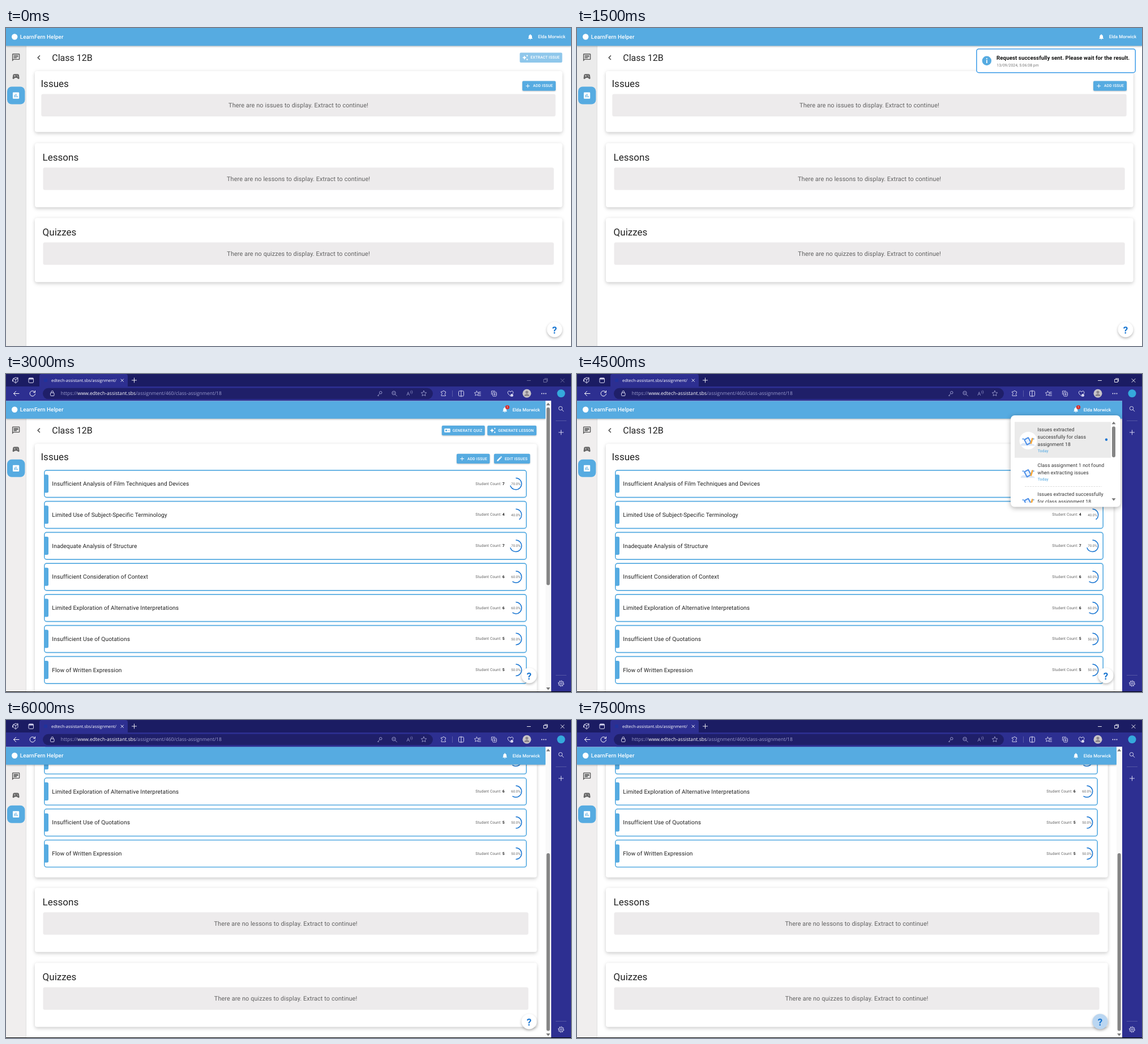
Animation of 998 by 561 pixels, one loop 8 s. Source, as an HTML page:

```html
<!DOCTYPE html>
<html lang="en">
<head>
<meta charset="utf-8">
<title>Class issues</title>
<style>
html, body { margin: 0; width: 100%; height: 100%; overflow: hidden; background: #fff; }
svg { display: block; width: 998px; height: 561px; }
text { font-family: Roboto, sans-serif; letter-spacing: .009em; white-space: pre; text-rendering: geometricPrecision; }
.chrome { font-family: "Open Sans", sans-serif; letter-spacing: 0; }
.title { letter-spacing: 0; }
.button { font-weight: 500; letter-spacing: .03em; }
.card { filter: drop-shadow(0 3px 3px rgba(0,0,0,.15)) drop-shadow(0 0 3px rgba(0,0,0,.07)); }
.bar { filter: drop-shadow(0 1px 1.5px rgba(0,0,0,.3)); }
.raised { filter: drop-shadow(0 1px 1px rgba(0,0,0,.22)); }
.float { filter: drop-shadow(0 2px 2px rgba(0,0,0,.28)); }
.menu { filter: drop-shadow(0 2px 4px rgba(0,0,0,.32)); }
</style>
</head>
<body>
<svg id="stage" viewBox="0 0 998 561"></svg>
<script>
const BLUE = '#56abe1', DEEP = '#1976d2', INK = '#212121', GREY = '#666';
const PANEL = '#edebec', NAVY = '#1b1c63', INDIGO = '#2d2f91', PALE = '#d5d5ef';
const CHROME_H = 47.3, BAR_H = 31.5, PITCH = 54.75, SCROLL = 286.6;

const ICONS = {
  chat: 'M4 4h16v12H5.17L4 17.17V4m0-2c-1.1 0-1.99.9-1.99 2L2 22l4-4h14c1.1 0 2-.9 2-2V4c0-1.1-.9-2-2-2H4zm2 10h8v2H6v-2zm0-3h12v2H6V9zm0-3h12v2H6V6z',
  game: 'M21.58 16.09l-1.09-7.66C20.21 6.46 18.52 5 16.53 5H7.47C5.48 5 3.79 6.46 3.51 8.43l-1.09 7.66C2.2 17.63 3.39 19 4.94 19c.68 0 1.32-.27 1.8-.75L9 16h6l2.25 2.25c.48.48 1.13.75 1.8.75 1.56 0 2.75-1.37 2.53-2.91zM11 11H9v2H8v-2H6v-1h2V8h1v2h2v1zm4-1a1 1 0 110-2 1 1 0 010 2zm2 3a1 1 0 110-2 1 1 0 010 2z',
  chart: 'M19 3H5c-1.1 0-2 .9-2 2v14c0 1.1.9 2 2 2h14c1.1 0 2-.9 2-2V5c0-1.1-.9-2-2-2zM9 17H7v-7h2v7zm4 0h-2V7h2v10zm4 0h-2v-4h2v4z',
  bell: 'M12 22c1.1 0 2-.9 2-2h-4c0 1.1.89 2 2 2zm6-6v-5c0-3.07-1.64-5.64-4.5-6.32V4c0-.83-.67-1.5-1.5-1.5s-1.5.67-1.5 1.5v.68C7.63 5.36 6 7.92 6 11v5l-2 2v1h16v-1l-2-2z',
  add: 'M19 13h-6v6h-2v-6H5v-2h6V5h2v6h6v2z',
  edit: 'M3 17.25V21h3.75L17.81 9.94l-3.75-3.75L3 17.25zM20.71 7.04c.39-.39.39-1.02 0-1.41l-2.34-2.34c-.39-.39-1.02-.39-1.41 0l-1.83 1.83 3.75 3.75 1.83-1.83z',
  sparkle: 'M19 9l1.25-2.75L23 5l-2.75-1.25L19 1l-1.25 2.75L15 5l2.75 1.25L19 9zm-7.5.5L9 4 6.5 9.5 1 12l5.5 2.5L9 20l2.5-5.5L17 12l-5.5-2.5zM19 15l-1.25 2.75L15 19l2.75 1.25L19 23l1.25-2.75L23 19l-2.75-1.25L19 15z',
  quiz: 'M3 5h18a2 2 0 012 2v10a2 2 0 01-2 2H3a2 2 0 01-2-2V7a2 2 0 012-2zM5 9v6h6V9zM14 10.500v3h2v-3zM18 10.500v3h2v-3z',
  back: 'M15.41 7.41L14 6l-6 6 6 6 1.41-1.41L10.830 12z'
};

const ISSUES = [
  ['Insufficient Analysis of Film Techniques and Devices', 7],
  ['Limited Use of Subject-Specific Terminology', 4],
  ['Inadequate Analysis of Structure', 7],
  ['Insufficient Consideration of Context', 6],
  ['Limited Exploration of Alternative Interpretations', 6],
  ['Insufficient Use of Quotations', 5],
  ['Flow of Written Expression', 5]
];

const SCENES = [
  { at: 0, width: 998 },
  { at: 1500, width: 998, toast: true },
  { at: 3000, width: 953, browser: true, badge: true, dimmed: true },
  { at: 4500, width: 963, browser: true, badge: true, menu: true },
  { at: 6000, width: 953, browser: true, scroll: SCROLL },
  { at: 7500, width: 953, browser: true, scroll: SCROLL, hover: true }
];
const LOOP = 8000;

const rect = (x, y, w, h, fill, r = 0, extra = '') =>
  `<rect x="${x}" y="${y}" width="${w}" height="${h}" rx="${r}" fill="${fill}" ${extra}/>`;
const circle = (x, y, r, fill, extra = '') =>
  `<circle cx="${x}" cy="${y}" r="${r}" fill="${fill}" ${extra}/>`;
const stroke = (d, color = PALE, w = 1) =>
  `<path d="${d}" fill="none" stroke="${color}" stroke-width="${w}" stroke-linecap="round" stroke-linejoin="round"/>`;
const ring = (x, y, r, color = PALE, w = 1, extra = '') =>
  circle(x, y, r, 'none', `stroke="${color}" stroke-width="${w}" ${extra}`);
const group = (content, x = 0, y = 0) => `<g transform="translate(${x} ${y})">${content}</g>`;
// y is the middle of the capitals
const text = (x, y, size, content, fill = INK, extra = '') =>
  `<text x="${x}" y="${y + size * .355}" font-size="${size}" fill="${fill}" ${extra}>${content}</text>`;
const icon = (name, x, y, size, fill = '#fff') =>
  `<path transform="translate(${x - size / 2} ${y - size / 2}) scale(${size / 24})" fill="${fill}" fill-rule="evenodd" d="${ICONS[name]}"/>`;
const MIDDLE = 'text-anchor="middle"';
const MEDIUM = 'font-weight="500"';

function button(x, y, w, label, name, fill = BLUE) {
  const shadow = fill === BLUE ? 'class="raised"' : '';
  return rect(x, y, w, 17.3, fill, 2, shadow) + icon(name, x + 9.7, y + 8.700, 11.5)
    + text(x + 19, y + 8.5, 6.75, label, '#fff', 'class="button"');
}

const card = (y, h, width) => rect(51, y, width - 66.3, h, '#fff', 4, 'class="card"');

function emptyPanel(x, y, right, kind) {
  return rect(x, y, right - x, 39.6, PANEL, 3)
    + text((x + right) / 2, y + 19.9, 10.87, `There are no ${kind} to display. Extract to continue!`, '#616161', MIDDLE);
}

function emptyCard(y, width, title) {
  return card(y, 113, width) + text(64.6, y + 24.7, 17, title, INK, 'class="title"')
    + emptyPanel(65.5, y + 43, width - 30.3, title.toLowerCase());
}

function issueRow([name, count], i, width) {
  const y = 121.8 + i * PITCH, mid = y + 24.4, x = width - 52.5;
  return rect(67.8, y + .8, width - 101.6, 47.700, '#fff', 4, `stroke="${BLUE}" stroke-width="1.6"`)
    + `<path d="M67.5 ${y + 8.5}h5a2.5 2.5 0 0 1 2.5 2.500v27a2.500 2.500 0 0 1-2.500 2.500h-5z" fill="${BLUE}"/>`
    + text(81.3, mid, 10.2, name)
    + text(width - 123.7, mid - .2, 6.8, `Student Count: <tspan font-weight="700" fill="${INK}">${count}</tspan>`, GREY)
    + ring(x, mid + .2, 10.2, DEEP, 1.5, `pathLength="100" stroke-dasharray="${count * 10} 100" transform="rotate(-90 ${x} ${mid + .2})"`)
    + text(x, mid + .2, 6.1, count * 10 + '.0%', GREY, MIDDLE);
}

function content({ width, browser }) {
  const heading = icon('back', 58, 52.3, 17, '#444') + text(81.3, 52.4, 16, 'Class 12B', INK, 'class="title"');
  const title = text(61.5, 98.4, 17, 'Issues', INK, 'class="title"');
  if (!browser) {
    return heading + button(907.5, 43.6, 75, 'EXTRACT ISSUE', 'sparkle', '#8fc7eb')
      + card(76, 107.5, width) + title + button(912, 93.5, 59, 'ADD ISSUE', 'add')
      + emptyPanel(62.3, 116.5, 970.7, 'issues')
      + emptyCard(203.2, width, 'Lessons') + emptyCard(335.2, width, 'Quizzes');
  }
  return heading
    + button(width - 183.2, 43.6, 76, 'GENERATE QUIZ', 'quiz')
    + button(width - 102.7, 43.6, 86.700, 'GENERATE LESSON', 'sparkle')
    + card(76, 441, width) + title
    + button(width - 157, 93.5, 58.5, 'ADD ISSUE', 'add')
    + button(width - 91, 93.5, 63.7, 'EDIT ISSUES', 'edit')
    + ISSUES.map((issue, i) => issueRow(issue, i, width)).join('')
    + emptyCard(535.5, width, 'Lessons') + emptyCard(667.9, width, 'Quizzes');
}

function appFrame({ width, browser, badge }) {
  const inner = browser ? 953 : 998;
  return rect(0, BAR_H, 35, 530, browser ? '#f0eeee' : '#ebebeb') + rect(35, BAR_H, .8, 530, '#d9d9d9')
    + icon('chat', 17.6, 52, 16, '#555') + icon('game', 17.6, 85.6, 15, '#666')
    + rect(2, 103.5, 31.4, 31, BLUE, 8) + icon('chart', 17.6, 119, 15)
    + rect(0, 0, width, BAR_H, BLUE, 0, 'class="bar"')
    + circle(15.2, 15.5, 5.2, '#fff')
    + text(24.800, 15.4, 9.75, 'LearnFern Helper', '#fff', MEDIUM)
    + icon('bell', inner - 71.800, 15.6, 11.5)
    + (badge ? circle(885.6, 11.3, 3.7, '#d32f2f') + text(885.6, 11.3, 5, '1', '#fff', MIDDLE) : '')
    + text(inner - 58.3, 15.4, 7.9, 'Elda Morwick', '#fff', MEDIUM);
}

function helpButton({ width, hover }) {
  const x = width - 29;
  return circle(x, 532, 13.5, hover ? '#bad6f1' : '#fff', 'class="float"')
    + text(x, 532.7, 17, '?', DEEP, `${MIDDLE} font-weight="700"`);
}

function toast() {
  return rect(705.8, 36.9, 280.5, 41.8, '#fff', 4, 'stroke="#3b9be8" stroke-width="1.5"')
    + circle(723.8, 57.800, 8.2, BLUE) + circle(723.8, 54, 1.1, '#fff') + rect(723, 56.300, 1.700, 5.700, '#fff')
    + text(741, 53, 9.68, 'Request successfully sent. Please wait for the result.', '#111', 'font-weight="700"')
    + text(741.3, 65.3, 6.8, '13/09/2024, 5:06:08 pm', '#757575');
}

function arrow(x, y, dir) {
  return `<path d="M${x - 3.5} ${y + 2 * dir}h7l-3.5 ${-4.5 * dir}z" fill="#777"/>`;
}

function pageScrollbar(top) {
  return rect(953, CHROME_H, 10, 513, '#f9f9f9') + arrow(957.7, 53.3, 1) + arrow(957.7, 555, -1)
    + rect(954.700, top, 6, 313.500, '#858585', 3);
}

function notice(y, lines, unread) {
  const mid = y + lines.length * 6.5;
  const art = circle(797, mid, 15.5, '#fff')
    + `<path d="M784 ${mid + 7}q3-4 7-2q6-4 10 1q6-1 8 3h-25z" fill="#dbe6f5"/>`
    + group(rect(-5, -6, 10, 12, '#4c8fe8', 1.5) + rect(-3, -4, 6, 8, '#e8f1fd', 1), 796, mid + 1).replace(')"', ') rotate(-28)"')
    + group(rect(-1.4, -6, 2.800, 11, '#f4a63a', 1), 803, mid + 1).replace(')"', ') rotate(18)"')
    + circle(788, mid - 3, 1.5, '#7db2ef') + circle(806.500, mid - 3, 1.3, '#7db2ef');
  return (unread ? rect(773, 84.5, 170, 63.3, '#ebebeb') + circle(935, 115.8, 2.2, DEEP) : '') + art
    + lines.map((line, i) => text(813.6, y + i * 13.1, 8.7, line, '#333')).join('')
    + text(813.8, y + lines.length * 13.1 - 1.6, 7, 'Today', '#69b4e6', MEDIUM);
}

function menu() {
  return rect(766, 73, 194, 161.5, '#fff', 7, 'class="menu"')
    + '<clipPath id="menuClip"><rect x="770" y="79" width="186" height="148"/></clipPath><g clip-path="url(#menuClip)">'
    + notice(98, ['Issues extracted', 'successfully for class', 'assignment 18'], true)
    + notice(161.2, ['Class assignment 1 not found', 'when extracting issues'])
    + '<path d="M791 198.5H927" stroke="#ddd" stroke-dasharray="3 1.500"/>'
    + notice(212, ['Issues extracted successfully', 'for class assignment 18']) + '</g>'
    + arrow(948, 86.500, 1) + arrow(948, 221.300, -1) + rect(945, 92.500, 6, 54.500, '#858585', 3);
}

function lens(x, y, color) {
  return ring(x - 1, y - 1, 3.2, color) + stroke(`M${x + 1.4} ${y + 1.4}l3 3`, color);
}

function star(x, y, r, color) {
  const points = Array.from({ length: 10 }, (_, i) => {
    const a = i * Math.PI / 5, d = i % 2 ? r * .48 : r;
    return `${x + d * Math.sin(a)} ${y - d * Math.cos(a)}`;
  });
  return stroke('M' + points.join('L') + 'z', color, .9);
}

function chrome({ dimmed }) {
  const win = dimmed ? '#7374a5' : '#fff', soft = '#9a9bce';
  return rect(0, 0, 998, 23, NAVY) + rect(0, 22, 998, 25.3, INDIGO) + rect(963, 22, 35, 539, INDIGO)
    + rect(59, 0, 156, 26, INDIGO, 4)
    // tab strip
    + stroke('M13 8l4-2 4 2v5l-4 3-4-3zM13 8l4 2 4-2M17 10v6M11.500 10v3M20 6l1.500 1')
    + rect(40, 7, 8.500, 8.500, 'none', 1.5, `stroke="${PALE}"`) + rect(40, 7, 8.500, 2.5, PALE, 1)
    + rect(67, 8, 6, 6, '#20329c', 1)
    + text(80, 11, 7.4, 'edtech-assistant.sbs/assignment/', '#fff', 'class="chrome"')
    + stroke('M203 9l4.500 4.500M207.500 9l-4.500 4.500M222.500 11h8M226.500 7v8', '#fff', .9)
    + stroke('M920.500 11.500h6M950 9.500h5v5h-5zM951.500 8h5v5M980 8.500l6 6M986 8.500l-6 6', win, .9)
    // address row
    + stroke('M23 34.500H13.500m4-4l-4 4 4 4', '#fff')
    + stroke('M50.500 31.500a4.700 4.700 0 1 0 1 3.500M51.500 29.500v3h-3', '#fff')
    + rect(65, 24.800, 689, 19.500, '#1f1f69', 9.7)
    + rect(78.500, 33, 6.500, 5.500, 'none', 1, `stroke="${PALE}"`) + stroke('M80 33v-1.500a1.750 1.750 0 0 1 3.500 0V33')
    + text(96.7, 34.4, 8.61, 'https://<tspan fill="#fff">www.edtech-assistant.sbs</tspan>/assignment/460/class-assignment/18', soft, 'class="chrome"')
    + ring(661.800, 32.800, 2.2, soft) + stroke('M660.300 34.500l-3.800 3.800h2', soft)
    + lens(686, 34.500, soft) + stroke('M683.500 33.500h3', soft, .8)
    + text(707.500, 35, 9, 'A', soft, 'class="chrome"') + stroke('M714.500 30q2 2 0 4M716.500 29q3 3 0 6', soft, .7)
    + star(738, 34.500, 5, soft)
    + stroke('M769 31h2.500a1.500 1.500 0 0 1 3 0h2v3a1.500 1.500 0 0 0 0 3v1.500h-7.500V36a1.500 1.500 0 0 0 0-3z', PALE, .9)
    + rect(788, 29, .8, 11, '#6567ad')
    + rect(799.500, 30, 9, 9, 'none', 1.500, `stroke="${PALE}"`) + stroke('M804 29v11')
    + star(831.500, 34.500, 4.500, PALE) + stroke('M835 32h3.500M835.500 35h3M835 38h3.500')
    + rect(859.500, 32, 7, 7, 'none', 1.500, `stroke="${PALE}"`) + stroke('M857.500 36v-6h6M863 33.700v3.600M861.200 35.500h3.600', PALE, .9)
    + stroke('M891 39l-4-4q-2-4 1.500-5 2 0 2.500 2 .5-2 3-2 3 1 1.500 4.500') + circle(893.500, 37.500, 2.500, PALE)
    + circle(920, 34.300, 7.500, '#c9c5c8') + circle(920, 32, 2.500, '#8d878c') + `<path d="M915.500 39a4.500 4 0 0 1 9 0z" fill="#8d878c"/>`
    + [946.500, 950, 953.500].map(x => circle(x, 34.500, .9, '#fff')).join('')
    // side strip
    + circle(980.500, 34.300, 7, '#35a9dc')
    + lens(980.500, 61.500, PALE) + rect(971, 82, 19, .7, '#6567ad')
    + stroke('M976.500 103h8M980.500 99v8') + rect(971, 531, 19, .7, '#6567ad')
    + ring(980.500, 546, 4, PALE, 1) + ring(980.500, 546, 5, PALE, 1, 'pathLength="16" stroke-dasharray="1 1"')
    + ring(980.500, 546, 1.6);
}

function scene(s, i) {
  const top = s.browser ? CHROME_H : 0, scroll = s.scroll || 0;
  const page = `<clipPath id="page${i}"><rect y="${top}" width="${s.width}" height="${561 - top}"/></clipPath>`
    + `<g clip-path="url(#page${i})">` + group(content(s), 0, top - scroll) + group(appFrame(s), 0, top) + '</g>';
  return rect(0, 0, 998, 561, '#fff') + page
    + (s.browser ? chrome(s) : '')
    + (s.browser && !s.menu ? pageScrollbar(scroll ? 235 : 59) : '')
    + helpButton(s) + (s.toast ? toast() : '') + (s.menu ? menu() : '')
    + (s.browser ? rect(0, 560, 998, 1, '#000') : '');
}

const stage = document.getElementById('stage');
stage.innerHTML = SCENES.map((s, i) => `<g visibility="hidden">${scene(s, i)}</g>`).join('');
const layers = [...stage.children];
const start = performance.now();
let shown = -1;

function tick() {
  const t = (performance.now() - start) % LOOP;
  const current = SCENES.findLastIndex(s => t >= s.at);
  if (current !== shown) {
    layers.forEach((layer, i) => layer.setAttribute('visibility', i === current ? 'visible' : 'hidden'));
    shown = current;
  }
  requestAnimationFrame(tick);
}
tick();
</script>
</body>
</html>
```
